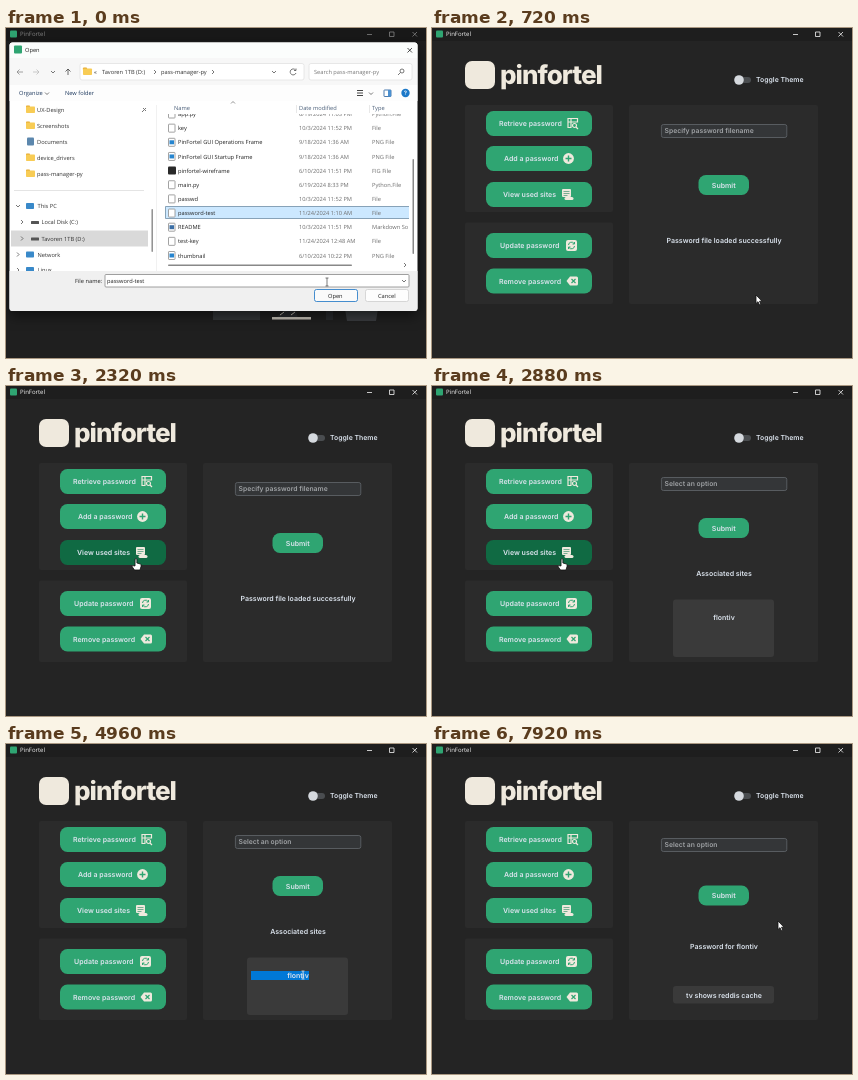
An HTML page with a canvas for the animation above (8000 ms loop, 420 by 330 pixels).

```html
<!DOCTYPE html>
<html lang="en">
<head>
<meta charset="utf-8">
<title>PinFortel</title>
<style>
html, body { margin: 0; height: 100%; overflow: hidden; background: #242424; }
canvas { display: block; width: 100vw; height: 100vh; }
</style>
</head>
<body>
<canvas id="stage"></canvas>
<script>
const W = 420, H = 330, LOOP = 8000, STEP = 80;
const GREEN = '#2fa572', DARK = '#106a43', CREAM = '#efe9dd', LIGHT = '#dce4ee';
const UI = 'Inter, sans-serif', SYS = '"Open Sans", "Noto Sans", sans-serif';
const dpr = window.devicePixelRatio || 1;

function setup(cv) {
  cv.width = W * dpr;
  cv.height = H * dpr;
  const c = cv.getContext('2d');
  c.scale(dpr, dpr);
  c.textRendering = 'geometricPrecision';
  return c;
}
const main = setup(document.getElementById('stage'));
const sheet = document.createElement('canvas');
let g = main;

// ---- drawing helpers ----
function text(s, x, y, size, color, { w = 600, align = 'left', font = UI } = {}) {
  g.font = `${w} ${size}px ${font}`;
  g.textAlign = align;
  g.fillStyle = color;
  g.fillText(s, x, y + size * 0.36);
}
function sys(s, x, y, color = '#333', size = 5.7) {
  text(s, x, y, size, color, { w: 400, font: SYS });
}
function box(x, y, w, h, r, fill, stroke) {
  g.beginPath();
  g.roundRect(x, y, w, h, r);
  if (fill) { g.fillStyle = fill; g.fill(); }
  if (stroke) { g.strokeStyle = stroke; g.lineWidth = 0.8; g.stroke(); }
}
function disc(x, y, r, color) {
  g.beginPath();
  g.arc(x, y, r, 0, 7);
  g.fillStyle = color;
  g.fill();
}
function line(d, color, w = 0.8, x = 0, y = 0) {
  g.save();
  g.translate(x, y);
  g.strokeStyle = color;
  g.lineWidth = w;
  g.stroke(new Path2D(d));
  g.restore();
}
function shape(d, color, dotted) {
  const p = new Path2D(d);
  g.fillStyle = color;
  g.fill(p);
  if (dotted) dots(p);
}
function dots(p) {
  g.save();
  g.clip(p);
  g.fillStyle = '#e9b45f';
  for (let i = 0; i < 2700; i++) {
    const x = 204 + (i % 60) * 3, y = 165 + Math.floor(i / 60) * 3;
    g.fillRect(x + Math.sin(i * 12.9) * 1.2, y + Math.sin(i * 78.2) * 1.2, 1.2, 1.2);
  }
  g.restore();
}
function leaf(x, y, rx, ry, rot) {
  const p = new Path2D();
  p.ellipse(x, y, rx, ry, rot, 0, 7);
  g.fillStyle = GREEN;
  g.fill(p);
  dots(p);
}

// ---- icons, centred on x, y ----
const icons = {
  find(x, y) {
    line('M3-5H-4.5V4H-1M-1.5-5V4M-4.5-1.5H5V-5H2M5-1V-2', CREAM, 1.2, x, y);
    line('M4 2A2 2 0 1 1 0 2A2 2 0 1 1 4 2M3.5 3.5L5.5 5.5', CREAM, 1.2, x, y);
  },
  add(x, y) { disc(x, y, 5.4, CREAM); line('M-3 0H3M0-3V3', GREEN, 1.4, x, y); },
  list(x, y) {
    box(x - 5.5, y - 5.5, 9, 8, 1, CREAM);
    box(x - 3, y + 2.5, 9, 3, 1.5, CREAM);
    line('M-4-3H2M-4-1H2M-4 1H0', '#6aa78b', 0.9, x, y);
  },
  cycle(x, y) {
    box(x - 5.5, y - 5.5, 11, 11, 2, CREAM);
    line('M-3-.5A3 3 0 0 1 2.5-2M3-3.5V-1.5H1M3 .5A3 3 0 0 1-2.5 2M-3 3.5V1.5H-1', GREEN, 1, x, y);
  },
  erase(x, y) {
    g.save(); g.translate(x, y);
    shape('M-6 0L-2.5-4.5H4Q5.5-4.5 5.5-3V3Q5.5 4.5 4 4.5H-2.5Z', CREAM);
    g.restore();
    line('M-1-2L3 2M3-2L-1 2', GREEN, 1.2, x, y);
  },
  key(x, y) {
    disc(x - 2, y - 2, 3.4, CREAM);
    disc(x - 2.6, y - 2.6, 1, GREEN);
    line('M0 0L5 5M3 3L5 1.5', CREAM, 1.8, x, y);
  },
  newKey(x, y) { icons.key(x, y); line('M-4 3.5H0M-2 1.5V5.5', CREAM, 1, x, y); },
  folder(x, y) {
    g.save(); g.translate(x, y);
    shape('M-5.5-4.5H-1.5L0-3H5V4H-5.5Z', CREAM);
    g.restore();
    disc(x + 3, y + 2, 1.7, GREEN);
    disc(x + 3, y + 2, 0.8, CREAM);
  },
  doc(x, y) { box(x - 4.5, y - 5.5, 9, 11, 1.5, CREAM); line('M-2 1H2M0-1V3', GREEN, 1.1, x, y); }
};

// ---- pointer ----
const path = [
  [0, 321, 254], [80, 321, 254], [240, 324, 267], [960, 324, 267], [1440, 244, 161],
  [1840, 244, 161], [2320, 130, 173], [2960, 130, 173], [3520, 299, 231], [3760, 297, 231],
  [5280, 297, 231], [5680, 108, 97], [5800, 108, 97], [6080, 263, 105], [6960, 263, 105],
  [7200, 293, 164], [7600, 293, 164], [7920, 346, 177], [LOOP, 346, 177]
];
function pointerAt(t) {
  const i = Math.max(1, path.findIndex(k => k[0] > t));
  const [t0, x0, y0] = path[i - 1], [t1, x1, y1] = path[i];
  const u = (t - t0) / (t1 - t0), e = u * u * (3 - 2 * u);
  return { x: x0 + (x1 - x0) * e, y: y0 + (y1 - y0) * e };
}
let mouse, look;
const over = (x, y, w, h) =>
  mouse.x >= x && mouse.x <= x + w && mouse.y >= y && mouse.y <= y + h;

function drawPointer() {
  g.save();
  g.translate(mouse.x, mouse.y);
  g.lineWidth = 0.8;
  if (look === 'beam') {
    line('M-1.5-4H1.5M0-4V4M-1.5 4H1.5', mouse.dark ? '#444' : '#eee', 0.7);
  } else {
    const p = new Path2D(look === 'hand'
      ? 'M-.9 0Q0-1 .9 0V4L4.5 5Q5.5 5.3 5 7.5L4 11H-1.5L-4 7.5Q-3.5 6-1 7Z'
      : 'M0 0V8.5L2 6.7L3.4 9.7L4.8 9L3.5 6.2H6Z');
    g.fillStyle = '#fff';
    g.strokeStyle = '#111';
    g.fill(p);
    g.stroke(p);
  }
  g.restore();
}

// ---- app ----
function button(x, y, w, h, label, tx, icon, ix) {
  const hot = look !== 'blocked' && over(x, y, w, h);
  if (hot) look = 'hand';
  box(x, y, w, h, 7.5, hot ? DARK : GREEN);
  const cy = y + h / 2;
  if (icon) {
    text(label, tx, cy, 7, LIGHT);
    icons[icon](ix, cy);
  } else text(label, x + w / 2, cy, 7, LIGHT, { align: 'center' });
}
function titleBar(active) {
  const c = active ? '#f4f4f4' : '#858585';
  box(0, 0, W, 13, 0, active ? '#1e1e1e' : '#191919');
  box(4, 2.5, 7, 7, 1, GREEN);
  sys('PinFortel', 14, 6.3, c, 6);
  line('M361 6.5H366M383.5 4H388V8.5H383.5ZM406.5 4L411 8.5M411 4L406.5 8.5', c);
}
function brand(x, y) {
  box(x, y, 30, 28, 7, CREAM);
  g.letterSpacing = '-1px';
  text('pinfortel', x + 35, y + 14, 26, CREAM, { w: 800 });
  g.letterSpacing = '0px';
}
function toggle() {
  box(303, 49, 16, 6, 3, '#4a4d50');
  disc(307, 52, 4.8, '#d5d9de');
  text('Toggle Theme', 324, 52, 6.9, LIGHT);
}
function entry(y, hint, typed) {
  if (over(229, y - 7, 126, 14)) look = 'beam';
  box(229.4, y - 6.5, 125.4, 13, 2, '#343638', '#63686c');
  if (typed === undefined) text(hint, 232.5, y, 6.8, '#a0a3a6');
  else text(typed, 232.5, y, 6.8, LIGHT);
}
const submit = y => button(266.5, y - 10, 50.5, 20, 'Submit');
const centred = (s, y) => text(s, 292, y, 7, LIGHT, { align: 'center' });

const panes = {
  loaded() {
    entry(103, 'Specify password filename');
    submit(157);
    centred('Password file loaded successfully', 212.5);
  },
  sites(t) {
    entry(98, 'Select an option');
    submit(142);
    centred('Associated sites', 187.5);
    box(241, 213.5, 101, 57.5, 3, '#3a3a3a');
    if (over(241, 213, 101, 58)) look = 'beam';
    const from = t >= 4000 ? 245 : 281;
    if (t >= 3920) box(from, 227, 303 - from, 9, 0, '#0078d7');
    centred('flontiv', 231.5);
  },
  ask(t) {
    const n = Math.floor((t - 6320) / STEP) + 1;
    entry(104.5, 'Enter site for password', t < 6240 ? undefined : 'flontiv'.slice(0, Math.max(0, n)));
    submit(163);
  },
  answer() {
    entry(101, 'Select an option');
    submit(151.5);
    centred('Password for flontiv', 202);
    box(241, 242, 101, 17.5, 3, '#3a3a3a');
    centred('tv shows reddis cache', 251);
  }
};
function vault(t) {
  brand(33, 33);
  toggle();
  box(33, 77, 148, 107, 2, '#2b2b2b');
  box(33, 194.5, 148, 81.5, 2, '#2b2b2b');
  box(197, 77, 189, 199, 2, '#2b2b2b');
  button(54, 83, 106, 25, 'Retrieve password', 67, 'find', 140.5);
  button(54, 118, 106, 25, 'Add a password', 72, 'add', 136.5);
  button(54, 154, 106, 25, 'View used sites', 71, 'list', 135.5);
  button(54, 205, 106, 25, 'Update password', 68, 'cycle', 139.5);
  button(54, 240.5, 106, 25, 'Remove password', 67, 'erase', 140.5);
  const pane = t < 2480 ? 'loaded' : t < 5760 ? 'sites' : t < 7280 ? 'ask' : 'answer';
  panes[pane](t);
}
function artwork() {
  // potted plants
  line('M226 210Q225 200 217 191M227 210Q227 200 231 190', '#667', 1);
  leaf(216, 191, 6, 11, -0.4);
  leaf(231, 191, 5.5, 10, 0.3);
  shape('M216 207H234L232 225H218Z', '#4a4d50');
  line('M356 270V185M356 245L372 232M356 245L342 232M356 220L372 212M356 220L343 210', '#6b6f73', 1.3);
  [[353, 187, 7, 14, -0.2], [374, 191, 8, 13, 0.6], [341, 211, 7, 11, -0.8], [373, 211, 8, 12, 0.9],
    [346, 233, 7, 11, -0.9], [374, 232, 8, 11, 0.9]].forEach(a => leaf(...a));
  shape('M335 269H376V275H373L370 293H341L338 275H335Z', '#44474a');
  // chair and legs
  shape('M320 240H327V292H320Z', '#303236');
  shape('M273 240H323Q327 258 305 260H287L289 284H278Z', '#45484c');
  shape('M270 290Q277 281 290 283L292 290Z', '#303236');
  shape('M266 289H305V291.5H266Z', CREAM);
  line('M274 287L278 284M285 287L289 284', CREAM, 1);
  // desk
  shape('M204 225H285V232H204Z', '#44474a');
  shape('M207 232H254V276H207Z', GREEN, true);
  shape('M207 276H254V292H207Z', '#3c3f42');
  line('M207 254H254', '#dfd8cc', 0.8);
  // figure
  shape('M285 178H298V192H285Z', '#d9a58c');
  shape('M281 166Q280 183 289 184Q301 183 302 169L293 161Z', '#e6b89e');
  shape('M278 165Q278 156 289 156Q304 154 303 169L299 176L297 168Q288 169 282 165Z', '#3a3e42');
  line('M284 178Q287 180 289 178M285 171V173', '#3a3e42', 0.8);
  shape('M280 189Q298 183 312 192Q326 202 327 244H276Q272 205 280 189Z', GREEN, true);
  shape('M281 190L268 214L250 220V228L274 229L288 212Z', GREEN, true);
  line('M287 205L282 223M305 206L303 230L276 235', '#197449', 1);
  shape('M243 222L252 220L253 227L244 227Z', '#e6b89e');
  shape('M235 197H269L275 224H241Z', CREAM);
  disc(254, 209, 2, '#4a4e52');
}
function welcome() {
  brand(134, 65);
  toggle();
  button(47, 118, 123, 25, 'Load existing key', 71, 'key', 140);
  button(47, 153.5, 123, 25, 'Load password file', 68, 'folder', 142);
  button(47, 206, 123, 25, 'Create a new key', 71, 'newKey', 140);
  button(47, 242, 123, 25, 'Create password file', 64, 'doc', 145.5);
  ['A free and easy way to safely', 'secure and manage your', 'passwords']
    .forEach((s, i) => text(s, 201.5, 120 + i * 12, 8.8, '#bfc3c8', { w: 700 }));
  artwork();
}

// ---- file dialog ----
const chevron = (x, y, c = '#555') => line('M-1-2L1 0L-1 2', c, 0.8, x, y);
const caret = (x, y, c = '#555') => line('M-2-1L0 1L2-1', c, 0.8, x, y);
function folder(x, y) {
  box(x, y - 4, 4, 3, 0.8, '#e5a72d');
  box(x, y - 3, 9, 6.5, 0.8, '#f8cc55');
}
function fileIcon(y, kind) {
  if (kind === 'FIG File') box(162, y - 4, 8, 8, 1, '#292929');
  else {
    box(162.5, y - 4, 6.5, 8, 0.6, '#fff', '#8c8c8c');
    if (kind === 'PNG File') box(163.5, y - 2, 4.5, 4, 0, '#2685cf');
    if (kind === 'Markdown So') box(163.5, y - 2, 4.5, 4, 0, '#3b6ea5');
  }
}
function dialog() {
  g.save();
  g.shadowColor = 'rgba(0,0,0,.6)';
  g.shadowBlur = 14;
  g.shadowOffsetY = 4;
  box(3.5, 14.5, 408, 268.5, 3, '#fff');
  g.restore();
  g.save();
  g.clip();
  box(3, 14, 409, 16, 0, '#fbfdfc');
  box(3, 30, 409, 27, 0, '#f7f7f7');
  box(3, 57, 409, 16, 0, '#fdfdfd');
  box(8, 17.5, 8, 8, 1, GREEN);
  sys('Open', 19, 22, '#222');
  line('M401.5 20L406 24.5M406 20L401.5 24.5', '#222');
  // address row
  line('M17 44H11M13.5 41.5L11 44L13.5 46.5', '#888');
  line('M27 44H33M30.5 41.5L33 44L30.5 46.5', '#bbb');
  caret(47, 44);
  line('M62 47V41M59.5 43.5L62 41L64.5 43.5', '#444');
  box(74, 35.5, 224, 16.5, 2, '#fff', '#e3e3e3');
  folder(77, 43.5);
  sys('«', 88, 43.5);
  sys('Tavoren 1TB (D:)', 96, 43.5);
  chevron(149, 44);
  sys('pass-manager-py', 155, 43.5);
  chevron(207, 44);
  caret(268, 44);
  line('M289.5 42A3 3 0 1 0 290 45M290 40.5V42.5H288', '#555');
  box(303, 35.5, 103, 16.5, 2, '#fff', '#e3e3e3');
  sys('Search pass-manager-py', 308, 43.5, '#777');
  line('M398 43A2 2 0 1 1 394 43A2 2 0 1 1 398 43M394.5 44.5L392 47', '#555');
  // toolbar
  sys('Organize', 13, 65, '#1f3a5f');
  caret(41, 65.5);
  sys('New folder', 59, 65, '#1f3a5f');
  line('M351 62.5H357M351 65H357M351 67.5H357', '#444', 1);
  caret(365, 65.5);
  box(378, 62, 7, 6.5, 0.5, '#fff', '#1e5a9a');
  box(382, 62, 3, 6.5, 0, '#4a90d0');
  disc(399.5, 65, 4.2, '#1c78c8');
  text('?', 399.5, 65, 6, '#fff', { align: 'center' });
  g.restore();
  // side tree
  g.save();
  g.beginPath();
  g.rect(5, 77, 398, 166);
  g.clip();
  ['UX-Design', 'Screenshots', 'Documents', 'device_drivers', 'pass-manager-py'].forEach((s, i) => {
    const y = 81.5 + i * 16;
    if (i === 2) box(21, y - 4, 7, 8, 1, '#5c87ad'); else folder(20, y);
    sys(s, 31, y);
  });
  line('M136 84L140 80M137 80L140 83', '#777', 1);
  line('M8 162.5H138', '#ddd');
  box(5, 202.5, 137, 16, 0, '#d9d9d9');
  caret(12, 178);
  [['This PC', 178, 0], ['Local Disk (C:)', 194, 4], ['Tavoren 1TB (D:)', 210.5, 4], ['Network', 226.5, 0], ['Linux', 242, 0]]
    .forEach(([s, y, dx], i) => {
      if (i) chevron(12 + dx, y);
      if (dx) box(25, y - 1, 8, 3, 0.5, '#555');
      else box(20, y - 3, 8, 6, 0.8, '#3989c9');
      sys(s, 31.5 + dx, y);
    });
  box(145.5, 181, 1.4, 43, 0.7, '#888');
  line('M150.5 74V243', '#eee');
  // file list
  box(159.5, 178.5, 250, 12, 0, '#cce8ff', '#6f8ea6');
  const png = 'PNG File', py = 'Python.File';
  [['app.py', '6/19/2024 11:03 PM', py], ['key', '10/3/2024 11:52 PM', 'File'],
    ['PinFortel GUI Operations Frame', '9/18/2024 1:36 AM', png],
    ['PinFortel GUI Startup Frame', '9/18/2024 1:36 AM', png],
    ['pinfortel-wireframe', '6/10/2024 11:51 PM', 'FIG File'], ['main.py', '6/19/2024 8:33 PM', py],
    ['passwd', '10/3/2024 11:52 PM', 'File'], ['password-test', '11/24/2024 1:10 AM', 'File'],
    ['README', '10/3/2024 11:51 PM', 'Markdown So'], ['test-key', '11/24/2024 12:48 AM', 'File'],
    ['thumbnail', '6/10/2024 10:22 PM', png]].forEach(([name, date, kind], i) => {
    const y = 86 + i * 14.15;
    fileIcon(y, kind);
    sys(name, 172, y, '#222');
    sys(date, 293, y, '#6d6d6d');
    sys(kind, 366, y, '#6d6d6d');
  });
  box(151, 73, 252, 13, 0, '#fff');
  sys('Name', 168, 80, '#4c607a');
  sys('Date modified', 293, 80, '#4c607a');
  sys('Type', 366, 80, '#4c607a');
  line('M290.5 75V85M363.5 75V85', '#e2e2e2');
  g.restore();
  line('M225 75.5L227 73.5L229 75.5', '#777');
  box(162, 236.5, 184, 1.5, 0.7, '#888');
  chevron(399, 237);
  box(406.5, 131, 1.5, 95, 0.7, '#888');
  // footer
  box(3.5, 243, 408, 40, [0, 0, 3, 3], '#f0f0f0');
  sys('File name:', 69, 252.5, '#222');
  box(99, 246.5, 304, 12.5, 1, '#fff', '#8a8a8a');
  sys('password-test', 101, 252.5, '#222');
  caret(398, 253);
  box(308.5, 261.5, 43, 12, 2, '#fafafa', '#1873c4');
  sys('Open', 322, 267.5, '#222');
  box(359.5, 261.5, 43, 12, 2, '#fdfdfd', '#cfcfcf');
  sys('Cancel', 372, 267.5, '#222');
}
g = setup(sheet);
dialog();
g = main;

// ---- timeline ----
function draw(t) {
  const fade = Math.min(1, Math.max(0, (t - 320) / 120));
  const open = fade < 1;
  mouse = pointerAt(t);
  mouse.dark = open;
  look = open ? 'blocked' : 'arrow';
  box(0, 0, W, H, 0, '#242424');
  titleBar(fade > 0);
  if (t < 640) welcome(); else vault(t);
  if (open) {
    const s = 1 - fade * 0.07;
    if (!fade) box(0, 13, W, H, 0, 'rgba(0,0,0,.15)');
    g.save();
    g.globalAlpha = 1 - fade;
    g.translate(207.5 - fade * 2, 148.5);
    g.scale(s, s);
    g.drawImage(sheet, -207.5, -148.5, W, H);
    g.restore();
    look = over(99, 246, 304, 13) ? 'beam' : 'arrow';
  }
  drawPointer();
}
function tick() {
  const t = performance.now() % LOOP;
  draw(Math.floor(t / STEP) * STEP);
  requestAnimationFrame(tick);
}
tick();
</script>
</body>
</html>
```
